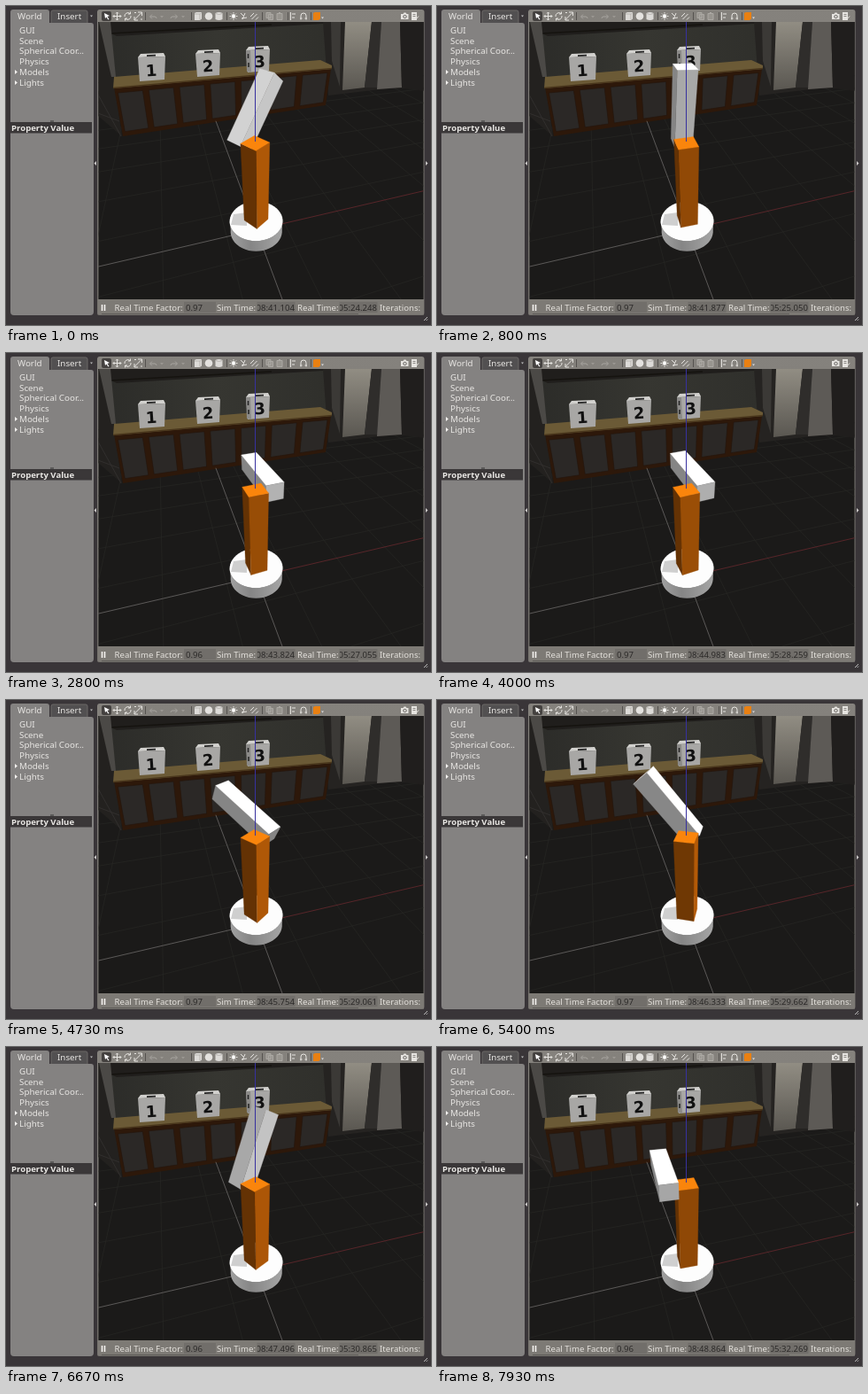
Recreate the animation shown at these times as an HTML page. Size 480 px wide and 360 px high, loop 7.99 s.

```html
<!DOCTYPE html>
<html lang="en">
<head>
<meta charset="utf-8">
<title>Robot arm simulation</title>
<style>
html, body { margin: 0; width: 100%; height: 100%; overflow: hidden; background: #393538; }
svg { display: block; width: 480px; height: 360px; }
text { font-family: "Noto Sans", "Open Sans", sans-serif; font-size: 9.8px; fill: #e9e7e4; }
.bold { font-weight: bold; font-size: 9.6px; }
.status text { font-size: 9.6px; fill: #e4e1dc; }
.status .value { fill: #2c2a29; }
.digit { font: bold 18px "DejaVu Sans", sans-serif; fill: #111; text-anchor: middle; }
</style>
</head>
<body>
<svg viewBox="0 0 480 360">
  <defs>
    <clipPath id="view"><rect x="104.500" y="18" width="367" height="313"/></clipPath>
    <clipPath id="simClip"><rect x="284" y="333" width="43" height="14"/></clipPath>
    <clipPath id="realClip"><rect x="377" y="333" width="43" height="14"/></clipPath>
    <linearGradient id="bar" x2="0" y2="1">
      <stop stop-color="#85827d"/><stop offset="1" stop-color="#6d6a66"/>
    </linearGradient>
    <linearGradient id="wall" x2="1" y2="0">
      <stop stop-color="#2b2b28"/><stop offset=".5" stop-color="#363631"/><stop offset="1" stop-color="#2f2f2b"/>
    </linearGradient>
    <linearGradient id="door" x2="0" y2="1">
      <stop stop-color="#918d83"/><stop offset="1" stop-color="#5a5751"/>
    </linearGradient>
    <linearGradient id="rim" x2="1" y2="0">
      <stop stop-color="#a2a2a2"/><stop offset=".4" stop-color="#858585"/><stop offset="1" stop-color="#a6a6a6"/>
    </linearGradient>
  </defs>
  <rect width="480" height="360" fill="#393538"/>

  <path d="M51 19V7q0-2 2-2h37q2 0 2 2v12" fill="#525051" stroke="#6b6867"/>
  <path d="M5 20V7q0-3 3-3h38q3 0 3 3v12h47q3 0 3 3v323q0 4-4 4H9q-4 0-4-4z" fill="#848281"/>
  <text x="13" y="15">World</text>
  <text x="58" y="15">Insert</text>
  <path d="M95 10.500h3l-1.500 2z" fill="#bbb"/>
  <g id="tree"></g>
  <path d="M10 72l3 2.500-3 2.500zM10 84l3 2.500-3 2.500z" fill="#f2f0ee"/>
  <path d="M50 130h4" stroke="#333"/>
  <rect x="5" y="131" width="92" height="12.500" fill="#3a3738"/>
  <text x="6" y="140.500" class="bold">Property Value</text>
  <path d="M102 175v5l-2.500-2.500zM474 175v5l2.500-2.500z" fill="#cfcccb"/>

  <rect x="103" y="4" width="369.500" height="345" rx="3" fill="url(#bar)"/>
  <g id="tools" fill="none" stroke="#e6e4e0" stroke-width="1"></g>

  <g clip-path="url(#view)">
    <rect x="104" y="18" width="368" height="313" fill="#1b1a19"/>
    <g id="floor" fill="none"></g>
    <g id="room"></g>
    <g id="axes" fill="none"></g>
    <g id="base"></g>
    <g id="arm"></g>
    <path d="M281.500 18V153" stroke="#37319f"/>
  </g>

  <g class="status">
    <rect x="103.500" y="331" width="368.500" height="17.500" fill="#7d7a75"/>
    <path d="M108 347.500h290" stroke="#5f5c59"/>
    <path d="M108.500 337v7M111.500 337v7" stroke="#f4f2ef" stroke-width="1.600"/>
    <path d="M201 334h36v12h-36zM283.500 334h43v12h-43zM376.500 334h43v12h-43z" fill="#716e6a"/>
    <text x="122.500" y="343.500">Real Time Factor:</text>
    <text x="203" y="343.500" class="value" id="factor"></text>
    <text x="238" y="343.500">Sim Time:</text>
    <g clip-path="url(#simClip)"><text x="326" y="343.500" text-anchor="end" class="value" id="sim"></text></g>
    <text x="329" y="343.500">Real Time:</text>
    <g clip-path="url(#realClip)"><text x="419" y="343.500" text-anchor="end" class="value" id="real"></text></g>
    <text x="422" y="343.500">Iterations:</text>
  </g>
  <path d="M472 355l4-4M474.500 355l1.500-1.500" stroke="#bbb"/>
</svg>
<script>
const LOOP = 7990, STEP = 200 / 3, RAD = Math.PI / 180;
const $ = id => document.getElementById(id);

// Camera looking down by 35 degrees; x right, y away, z up.
const S = Math.sin(35 * RAD), C = Math.cos(35 * RAD);
function project([x, y, z]) {
  const depth = 10 - S * z + C * y;
  return [288 + 318 * (x - 0.17) / depth, 175 + 318 * (2.08 - C * z - S * y) / depth];
}
const EYE = [0.17, 2.08 * S - 10 * C, 2.08 * C + 10 * S];

const add = (a, b, k = 1) => a.map((v, i) => v + b[i] * k);
const dot = (a, b) => a[0] * b[0] + a[1] * b[1] + a[2] * b[2];
const pts = list => list.map(p => p[0].toFixed(2) + "," + p[1].toFixed(2)).join(" ");
const poly = (points, fill, more = "") => `<polygon points="${points}" fill="${fill}" ${more}/>`;
const path = (d, more = "") => `<path d="${d}" ${more}/>`;

// Box with a centre, three unit axes and half sizes; only faces turned to the eye are drawn.
function box(centre, axes, half, paint) {
  let out = "";
  for (let i = 0; i < 3; i++) for (const sign of [-1, 1]) {
    const normal = axes[i].map(v => v * sign);
    const mid = add(centre, normal, half[i]);
    if (dot(normal, add(EYE, mid, -1)) <= 0) continue;
    const j = (i + 1) % 3, k = (i + 2) % 3;
    const corners = [[-1, -1], [1, -1], [1, 1], [-1, 1]].map(([a, b]) =>
      project(add(add(mid, axes[j], a * half[j]), axes[k], b * half[k])));
    const fill = paint(normal);
    out += poly(pts(corners), fill, `stroke="${fill}" stroke-width=".3"`);
  }
  return out;
}

const tint = (rgb, k) => `rgb(${rgb.map(v => Math.round(v * Math.min(1, k))).join()})`;
const lit = (n, light) => Math.max(0, dot(n, light));
const white = n => tint([255, 255, 255], 0.52 + 0.7 * lit(n, [0.4, -0.1, 0.9]));
const orange = n => n[2] > 0.9 ? "#fa850c" : tint([250, 126, 10], 0.4 + 0.43 * lit(n, [0.7, -0.25, 0.65]));

// time, column yaw, link pitch (degrees)
const POSES = [
  [0, 139, -40], [1533, 74, 30], [2800, 21, 91], [3400, 11, 91],
  [4000, 23, 89], [5400, 78, 39.5], [6667, 134, -26], [7933, 193, -90]
];
const SIM = [[0, 41.104], [8, 42.65], [14, 43.824], [20, 44.983], [27, 46.333], [33, 47.496], [40, 48.864]];

function segment(table, t) {
  let i = 0;
  while (i < table.length - 2 && t >= table[i + 1][0]) i++;
  return i;
}
function smooth(table, t, c) {
  const i = segment(table, t), a = table[i], b = table[i + 1], span = b[0] - a[0];
  const slope = n => {
    const p = table[Math.max(0, n - 1)], q = table[Math.min(table.length - 1, n + 1)];
    return (q[c] - p[c]) / (q[0] - p[0]) * span;
  };
  const u = (t - a[0]) / span, u2 = u * u, u3 = u2 * u;
  return (2 * u3 - 3 * u2 + 1) * a[c] + (u3 - 2 * u2 + u) * slope(i)
    + (3 * u2 - 2 * u3) * b[c] + (u3 - u2) * slope(i + 1);
}
function linear(table, t) {
  const i = segment(table, t), a = table[i], b = table[i + 1];
  return a[1] + (b[1] - a[1]) * (t - a[0]) / (b[0] - a[0]);
}

function drawArm(t) {
  const yaw = smooth(POSES, t, 1) * RAD, pitch = smooth(POSES, t, 2) * RAD;
  const side = [Math.cos(yaw), Math.sin(yaw), 0];
  const ahead = [-side[1], side[0], 0], up = [0, 0, 1];
  const along = [ahead[0] * Math.sin(pitch), ahead[1] * Math.sin(pitch), Math.cos(pitch)];
  const across = [ahead[0] * Math.cos(pitch), ahead[1] * Math.cos(pitch), -Math.sin(pitch)];
  const pivot = add([0, 0, 3.1], side, 0.54);
  const column = box([0, 0, 1.59], [side, ahead, up], [0.3, 0.3, 1.59], orange);
  const link = box(add(pivot, along, 0.95), [side, across, along], [0.28, 0.28, 1.16], white);
  $("arm").innerHTML = dot(side, EYE) < 0.27 ? link + column : column + link;
}

function render(now) {
  const frame = Math.floor((now % LOOP + 5) / STEP) % 120, t = frame * STEP;
  const tick = Math.round(frame / 3);
  drawArm(t);
  $("sim").textContent = "08:" + linear(SIM, tick).toFixed(3);
  $("real").textContent = "05:" + (24.248 + tick * 0.20053).toFixed(3);
  $("factor").textContent = (t >= 2000 && t < 3400) || t >= 6000 ? "0.96" : "0.97";
}

function drawFloor() {
  const FLOOR = -0.53, turn = 16.8 * RAD, c = Math.cos(turn), s = Math.sin(turn);
  const at = (u, v) => project([u * c - v * s, u * s + v * c, FLOOR]);
  const line = (a, b, color, width) =>
    `<polyline points="${pts([at(...a), at(...b)])}" stroke="${color}" stroke-width="${width}"/>`;
  let tiles = "";
  for (let n = -4; n <= 8; n++) {
    const k = n * 2.2 + 1.1;
    tiles += line([k, -4], [k, 18], "#282725", 0.7) + line([-9, k], [18, k], "#282725", 0.7);
  }
  $("floor").innerHTML = tiles;
  $("axes").innerHTML = line([0, 0], [9, 0], "#67292e", 0.8)
    + line([0, 0], [-7, 0], "#777573", 0.7) + line([0, -5], [0, 9.1], "#777573", 0.7);
}

function drawBase() {
  const ring = z => Array.from({ length: 48 }, (_, i) => {
    const a = i * 7.5 * RAD;
    return project([0.94 * Math.cos(a), 0.94 * Math.sin(a), z]);
  });
  const top = ring(0), low = ring(-0.53);
  const wall = [...top.slice(24), top[0], low[0], ...low.slice(24).reverse()];
  $("base").innerHTML = poly(pts(wall), "url(#rim)") + poly(pts(top), "#fdfdfd")
    + poly("257,235 272,233 272,248 254,247", "#cfcfcf");
}

function crate(x, y, w, h, digit, lean) {
  return poly(`${x},${y + 4} ${x + 3},${y} ${x + w - 2},${y - 1} ${x + w},${y + 3}`, "#d2d1ce")
    + path(`M${x + 10} ${y + 2.200}l10-.6`, `stroke="#222" stroke-width="1.800"`)
    + poly(`${x},${y + 4} ${x + w},${y + 3} ${x + w - 1},${y + h - 2} ${x + 2},${y + h}`, "#a8a7a5")
    + `<text class="digit" transform="translate(${x + w / 2 + lean} ${y + h - 6}) rotate(-4)">${digit}</text>`;
}

function drawRoom() {
  let out = poly("104,18 372,18 362,66 122,82", "url(#wall)")
    + poly("104,18 360,18 358,20 125,34 116,30", "#201e1c")
    + path("M117 31L300 21", `stroke="#15130f" stroke-width="1.500"`)
    + poly("104,18 113,18 131,147 104,124", "#23211f")
    + poly("105,18 118,18 124,80 119,80", "#4b4946")
    + path("M104 100l26 47M104 121l24 9", `stroke="#353331" fill="none" stroke-width=".8"`);
  out += poly("358,18 472,18 472,95 440,92 364,101", "#252321")
    + poly("367,18 378,18 377,91 368,62", "#3b3936")
    + poly("383,18 413,18 405,92 380,95", "url(#door)")
    + poly("413,18 424,18 420,92 405,92", "#2f2d2b")
    + poly("424,18 445,18 447,92 419,94", "#5d5a56")
    + poly("445,18 472,18 472,96 447,92", "#201e1d");
  out += poly("122,92 367,71 361,112 132,147", "#2d180a")
    + poly("122,80 355,61 368,67 368,71 121,93", "#6b5a36")
    + path("M121 92.500L368 70.500", `stroke="#49361c" stroke-width="1.600"`);
  // Cabinet doors between the upper and the lower edge of the front.
  const edge = (u, v) => {
    const x1 = 122 + 245 * u, y1 = 93 - 22 * u, x2 = 132 + 229 * u, y2 = 147 - 35 * u;
    return [x1 + (x2 - x1) * v, y1 + (y2 - y1) * v];
  };
  for (let i = 0; i < 7; i++) {
    const a = i / 7 + 0.014, b = (i + 1) / 7 - 0.014;
    out += poly(pts([edge(a, 0.1), edge(b, 0.1), edge(b, 0.91), edge(a, 0.91)]), "#2b2826",
      `stroke="#24160d" stroke-width=".7"`);
  }
  out += crate(149, 54, 31, 31, 1, 0) + crate(214, 50, 28, 30, 2, 0.5) + crate(271, 46, 27, 29, 3, 2.5)
    + poly("271,50 276,50 277,75 272,74", "#8b8a88")
    + path("M273.500 54v5M274 64v5", `stroke="#222" stroke-width="1.500"`);
  $("room").innerHTML = out;
}

function drawTools() {
  const seps = [157, 209, 249, 289, 318, 344].map(x => `M${x}.500 7v9`).join("");
  $("tools").innerHTML =
    `<rect x="108" y="6" width="11" height="11" rx="2" fill="#44413f" stroke="none"/>`
    + path("M111 8l6 3-2.500 1 2 3-1.200.6-1.800-3-1.500 1.400z", `fill="#fff" stroke="none"`)
    + path("M125.500 7v9M121 11.500h9M124 8.500l1.500-1.500 1.500 1.500M124 14.500l1.500 1.500 1.500-1.500M122.500 10l-1.500 1.500 1.500 1.500M128.500 10l1.500 1.500-1.500 1.500")
    + path("M134 12a3.700 3.700 0 0 1 6-3.500M141 11a3.700 3.700 0 0 1-6 3.500M140.500 6.500v2.500h-2.500M134.500 16.500v-2.500h2.500")
    + path("M145 15.500l8-8M145 12v4h4M149 7h4.500v4M145 7.500h2M153 14v2")
    + path(seps, `stroke="#55524f"`)
    + path("M163 12h5q2 0 2 2M165 9.500l-2.500 2.500 2.500 2.500M193 12h-5q-2 0-2 2M191 9.500l2.500 2.500-2.500 2.500", `stroke="#a7a49f"`)
    + path("M174 11h4l-2 2.500zM198 11h4l-2 2.500z", `fill="#9b9893" stroke="none"`)
    + path("M213 8l2-1h6v7.500l-2 1.500h-6z", `fill="#dddbd8" stroke="none"`)
    + path("M213 9h6v6.500M219 9l2-1.500", `stroke="#aaa7a3" stroke-width=".7"`)
    + `<circle cx="229" cy="11.500" r="4.300" fill="#e4e2df" stroke="none"/>`
    + path("M236.500 8q4-2 8 0v7q-4 2-8 0z", `fill="#dddbd8" stroke="none"`)
    + path("M236.500 8.500q4 2 8 0", `stroke="#aaa7a3" stroke-width=".7"`)
    + `<circle cx="257" cy="11.500" r="2" fill="#fff"/>`
    + path("M257 7v1.500M257 14.500v1.500M252.500 11.500h1.500M260 11.500h1.500M254 8.500l1 1M259 13.500l1 1M260 8.500l-1 1M255 13.500l-1 1")
    + path("M265 8l4 4M270 8l-3 7M272 13l-6 1M276 12l4-4M277.500 15l6-6M282 15.500l3-3")
    + path("M294 7.500h5v6h-5zM296.500 9.500h5v6h-5zM306 8.500h6v7h-6zM308 7.500h2", `fill="#98958f" stroke="#aba8a3"`)
    + path("M321.500 7v9M323 9h4M323 13h3M333 15.500v-4.500a3 3 0 0 1 6 0v4.500M332 14h2.500M337.500 14h2.500")
    + path("M347 8l2-1h6v7.500l-2 1.500h-6z", `fill="#e98012" stroke="none"`)
    + path("M356 12.500h3l-1.500 2z", `fill="#ddd" stroke="none"`)
    + path("M446 9h2.500l1-1.500h2l1 1.500h2v6H446z", `fill="#e6e4e0" stroke="none"`)
    + `<circle cx="450.500" cy="12" r="1.700" stroke="#65625f"/>`
    + path("M458 7h6v9h-6z", `fill="#e6e4e0" stroke="none"`)
    + path("M459.500 9.500h3M459.500 11.500h3", `stroke="#77746f" stroke-width=".8"`)
    + path("M463 15l3-3.500");
}

["GUI", "Scene", "Spherical Coor…", "Physics", "Models", "Lights"].forEach((label, i) => {
  $("tree").innerHTML += `<text x="15" y="${(30.800 + i * 11.800).toFixed(1)}">${label}</text>`;
});
drawTools();
drawFloor();
drawRoom();
drawBase();

const start = performance.now();
function loop() {
  render(performance.now() - start);
  requestAnimationFrame(loop);
}
loop();
</script>
</body>
</html>
```
